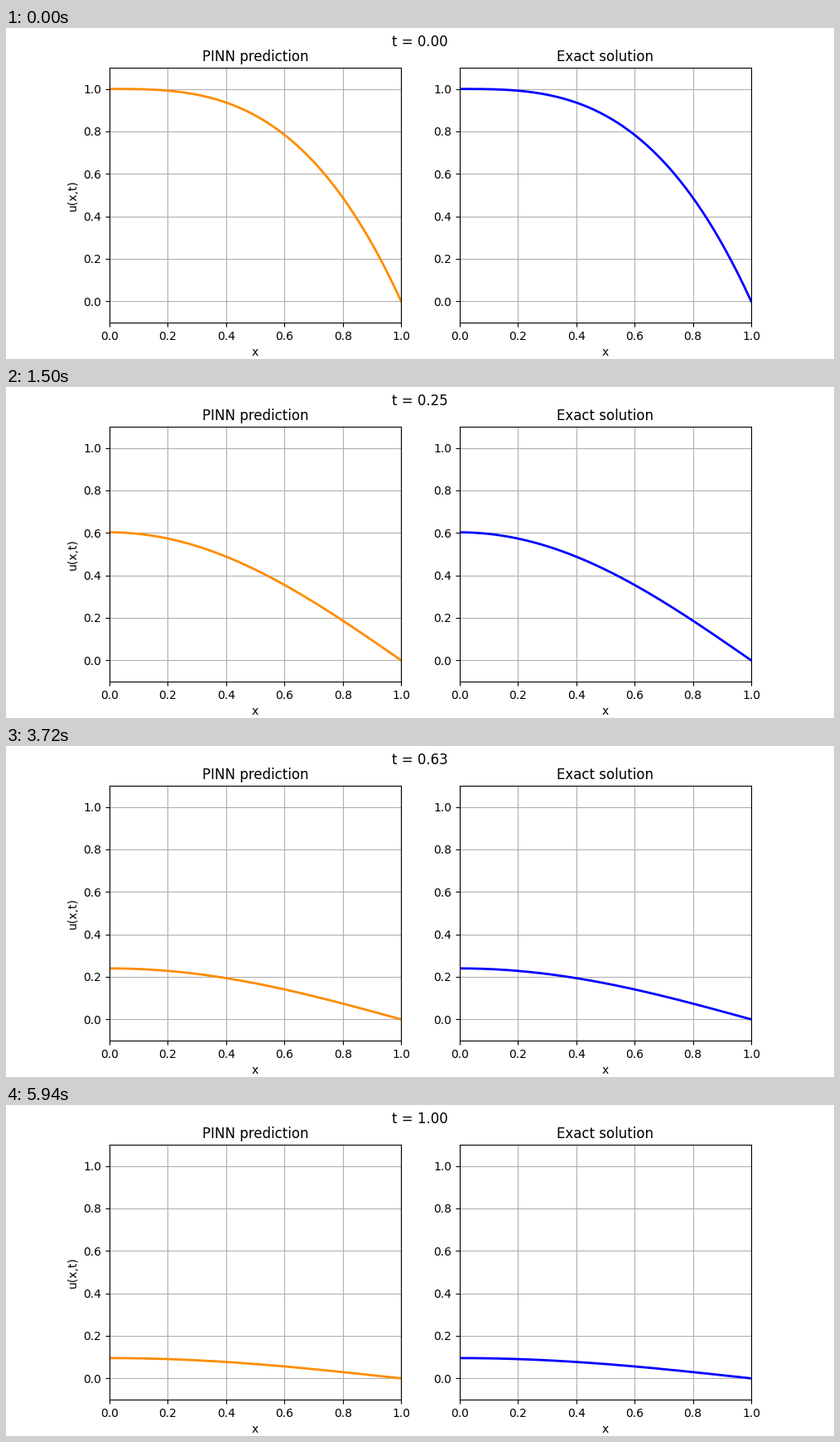
Write a matplotlib script that moves like this. It is 1000x400 px and loops after 6000 ms.

```python
import matplotlib.pyplot as plt
import numpy as np
from matplotlib.animation import FuncAnimation

FRAMES = 100
INTERVAL = 60

x = np.linspace(0, 1, 200)
times = np.linspace(0, 1, FRAMES)

# Heat equation, insulated at x=0, u=0 at x=1, starting from 1 - x^3.
n = np.arange(100)
lam = (n + 0.5) * np.pi
coeffs = 12 * ((-1.0) ** n / lam**3 - 1 / lam**4)
modes = np.cos(np.outer(x, lam))


def solution(t):
    if t == 0:
        return 1 - x**3
    return modes @ (coeffs * np.exp(-lam**2 * t))


def make_panel(ax, title, color):
    ax.set_title(title)
    ax.set_xlim(0, 1)
    ax.set_ylim(-0.1, 1.1)
    ax.set_xlabel("x")
    ax.grid(True)
    return ax.plot(x, solution(0), color=color, lw=2)[0]


fig, (left, right) = plt.subplots(1, 2, figsize=(10, 4), dpi=100)
lines = [
    make_panel(left, "PINN prediction", "darkorange"),
    make_panel(right, "Exact solution", "blue"),
]
left.set_ylabel("u(x,t)")
clock = fig.suptitle("t = 0.00")


def update(i):
    t = times[i]
    u = solution(t)
    for line in lines:
        line.set_ydata(u)
    clock.set_text(f"t = {t:.2f}")
    return [*lines, clock]


anim = FuncAnimation(fig, update, frames=FRAMES, interval=INTERVAL,
                     repeat=True, repeat_delay=0, blit=False)
plt.show()
```
